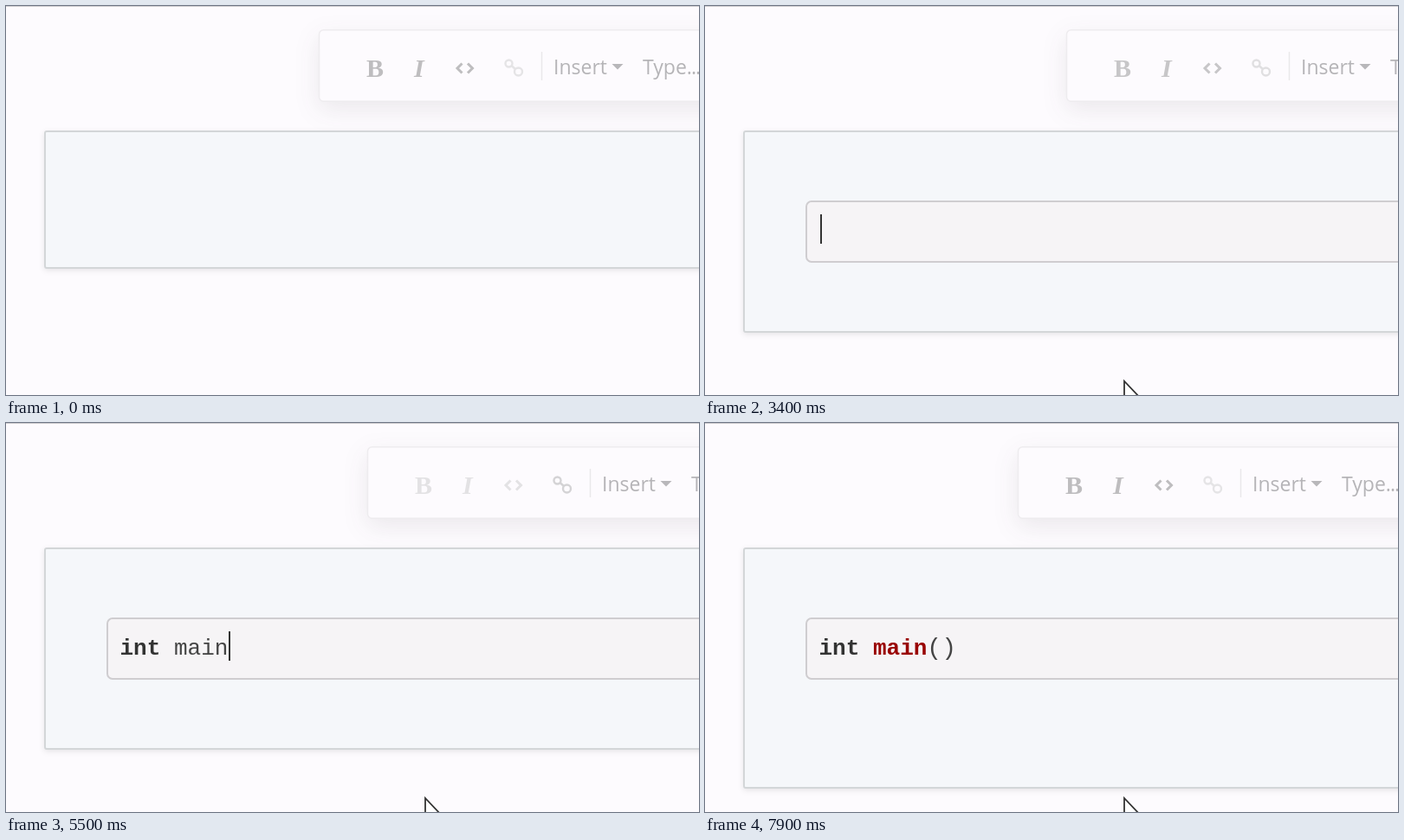
Animation, 800 px wide and 450 px high, one loop 8 s. Source, as an HTML page:

```html
<!DOCTYPE html>
<html lang="en">
<head>
<meta charset="utf-8">
<title>Code block editor</title>
<style>
  html, body { margin: 0; width: 100%; height: 100%; overflow: hidden; background: #fdfbfe; }
  svg { display: block; width: 100vw; height: 100vh; }
  text { white-space: pre; }
  .ui { font: 23px "Open Sans", sans-serif; fill: #b5b4b7; }
  .format { font: bold 30px "Liberation Serif", serif; }
  .italic { font-style: italic; }
  .prose { font: 28px "Open Sans", sans-serif; fill: #222; }
  .code { font: 26px "Liberation Mono", monospace; fill: #444; }
  .keyword { font-weight: bold; fill: #333; }
  .title { font-weight: bold; fill: #900; }
  .parens { font-size: 28px; }
  #field { fill: #f5f7fa; stroke: #d3d6d8; stroke-width: 2; filter: drop-shadow(0 2px 3px rgba(0, 0, 0, .09)); }
  #panel { fill: #fdfbfe; stroke: #eeecef; stroke-width: 1.5; filter: drop-shadow(0 9px 14px rgba(50, 40, 55, .09)); }
  #block rect { fill: #f6f4f6; stroke: #cfcdd0; stroke-width: 2; }
</style>
</head>
<body>
<svg viewBox="0 0 800 450">
  <rect width="800" height="450" fill="#fdfbfe"/>
  <rect width="800" height="1" fill="#d0ced1"/>

  <g id="toolbar">
    <rect id="panel" x="361.5" y="27.75" width="520" height="82.5" rx="5"/>
    <g id="formats">
      <text class="format" x="416" y="82">B</text>
      <text class="format italic" x="471" y="82">I</text>
      <path id="brackets" d="M526.5 66.5L521 72L526.5 77.5M533 66.5L538.5 72L533 77.5" fill="none" stroke-width="3"/>
    </g>
    <g id="link" fill="none" stroke-width="2.4">
      <circle cx="580.5" cy="66.5" r="4"/>
      <circle cx="591.5" cy="76" r="4.5"/>
      <path d="M583.5 69L588 73"/>
    </g>
    <path d="M618.5 53V86" stroke="#eae8eb" stroke-width="1.5"/>
    <text class="ui" x="632" y="79">Insert</text>
    <path d="M699.5 67H712.5L706 73.5Z" fill="#b8b7ba"/>
    <text class="ui" x="735" y="79">Type<tspan letter-spacing="-1">...</tspan></text>
  </g>

  <rect id="field" x="45" y="145" width="800" rx="2"/>
  <text id="prose" class="prose" x="115" y="237"></text>
  <g id="block">
    <rect x="117" y="226" width="760" height="70" rx="6"/>
    <text id="code" class="code" x="131.5" y="268"><tspan id="type"></tspan><tspan id="name"></tspan><tspan id="parens" class="parens"></tspan></text>
  </g>
  <rect id="caret" width="2"/>
  <path id="beam" d="M-6 -14H-2L0 -12.5L2 -14H6M0 -12.5V12.5M-6 14H-2L0 12.5L2 14H6" fill="none" stroke="#222" stroke-width="2"/>
  <path id="arrow" d="M0 0V27L6 21L10 31L14 29L10 20H19Z" fill="#fff" stroke="#333" stroke-width="1.8"/>
</svg>
<script>
const LOOP = 8000, STEP = 100;
const $ = id => document.getElementById(id);
const show = (el, on) => el.setAttribute("visibility", on ? "visible" : "hidden");
const clamp = x => Math.min(1, Math.max(0, x));
const mix = (a, b, k) => a + (b - a) * k;
const within = (t, a, b) => t >= a && t < b;
const gray = v => `rgb(${v + 1 | 0},${v | 0},${v + 2 | 0})`;
const textWidth = el => el.textContent ? el.getComputedTextLength() : 0;

function drawToolbar(t, codeMode) {
  // Button colours fade after the layout has switched.
  const k = clamp((t - 3300) / 400) - clamp((t - 6800) / 400);
  const main = gray(mix(189, 226, k));
  $("toolbar").setAttribute("transform", `translate(${codeMode ? 56 : 0} 0)`);
  $("formats").setAttribute("fill", main);
  $("brackets").setAttribute("stroke", main);
  $("link").setAttribute("stroke", gray(mix(228, 211, k)));
}

function drawPointer(t) {
  const enter = clamp((t - 500) / 400);
  const leave = clamp((t - 1100) / 500);
  const inEase = 1 - (1 - enter) ** 2;
  const outEase = leave * leave * (3 - 2 * leave);
  const x = mix(mix(326, 268, inEase), 484, outEase);
  const y = mix(mix(338, 230, inEase), 434, outEase);
  const overField = y < 303;
  for (const [id, on] of [["beam", overField], ["arrow", !overField]]) {
    $(id).setAttribute("transform", `translate(${x} ${y})`);
    show($(id), t >= 500 && on);
  }
}

function drawCaret(t) {
  const caret = $("caret");
  const place = (x, y, h, color) => {
    caret.setAttribute("x", x);
    caret.setAttribute("y", y);
    caret.setAttribute("height", h);
    caret.setAttribute("fill", color);
  };
  if (t < 3400) place(115.5 + textWidth($("prose")), 205, 38, "#111");
  else if (t < 6900) place(Math.round(132.5 + textWidth($("code"))), 241, 34, "#333");
  else place(115.5, 324, 38, "#111");
  show(caret, within(t, 1000, 1600) || within(t, 2100, 4300) ||
    within(t, 4600, 6700) || within(t, 7000, 7600));
}

function draw(now) {
  const t = Math.floor((now % LOOP) / STEP) * STEP;
  const codeMode = within(t, 3400, 6900);
  const prose = "[cpp".slice(0, [2100, 2600, 2900, 3100].filter(k => t >= k).length);
  let typed = t < 4600 ? 0 : Math.min(8, 1 + Math.floor((t - 4600) / 114));
  typed += (t >= 5800) + (t >= 6100);

  drawToolbar(t, codeMode);
  $("field").setAttribute("height", t < 3400 ? 158 : t < 6900 ? 232 : 277);
  $("prose").textContent = t < 3400 ? prose : "";
  show($("block"), t >= 3400);

  const source = "int main()".slice(0, typed);
  $("type").textContent = source.slice(0, 4);
  $("name").textContent = source.slice(4, 8);
  $("parens").textContent = source.slice(8);
  $("type").setAttribute("class", typed >= 3 ? "keyword" : "");
  $("name").setAttribute("class", typed > 8 ? "title" : "");

  drawCaret(t);
  drawPointer(t);
}

const start = performance.now();
function tick() {
  draw(performance.now() - start);
  requestAnimationFrame(tick);
}
tick();
</script>
</body>
</html>
```
